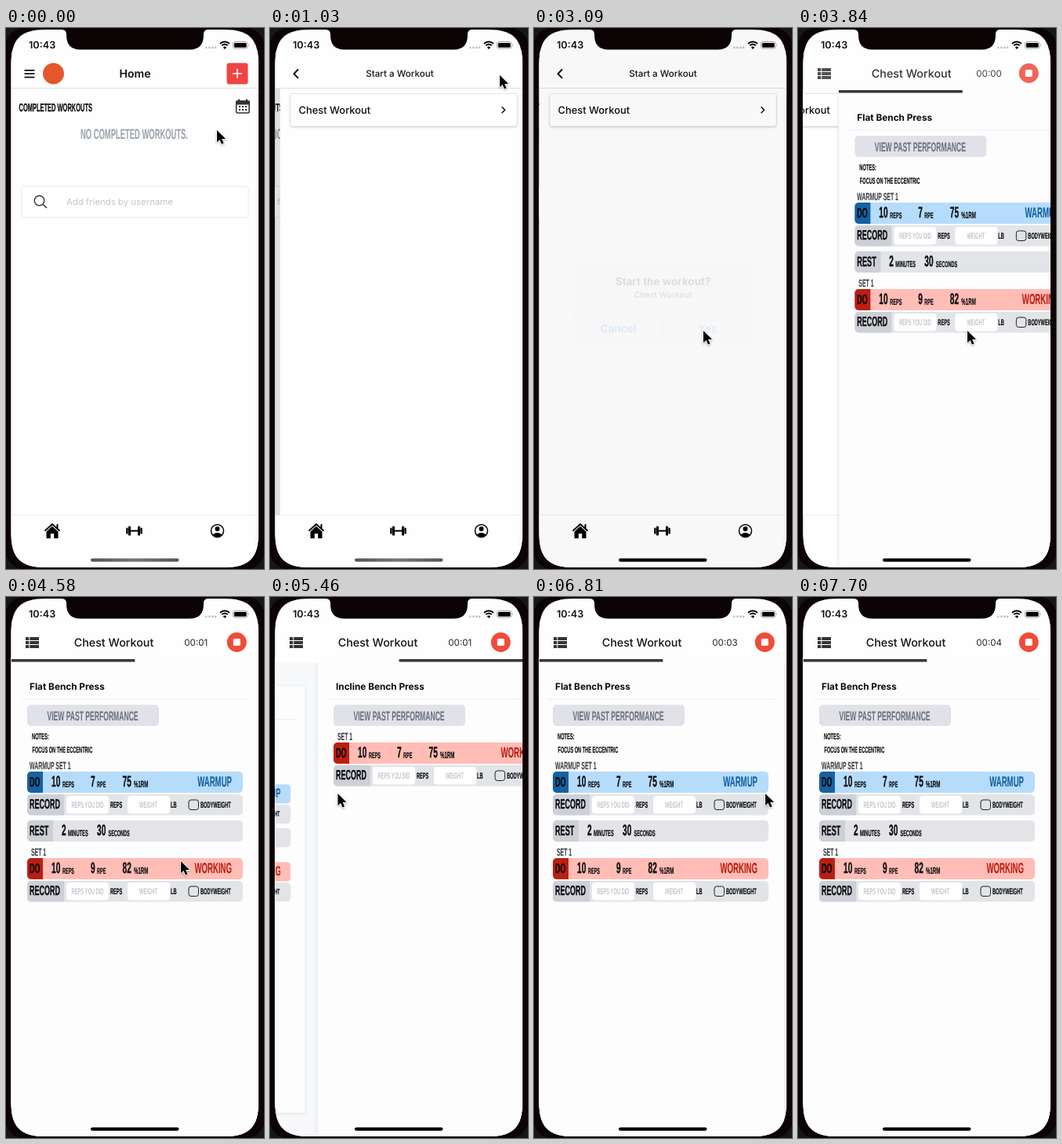
An HTML page that plays this animation: 329x688 px, repeating every 8.45 s.

```html
<!DOCTYPE html>
<html lang="en">
<head>
<meta charset="utf-8">
<title>Workout app demo</title>
<style>
html, body { margin: 0; width: 100%; height: 100%; overflow: hidden; background: #0b0304; }
svg { display: block; width: 329px; height: 688px; }
text { font-family: Inter, "Liberation Sans", sans-serif; white-space: pre; text-rendering: geometricPrecision; }
.narrow { font-family: "Liberation Sans", Arial, sans-serif; }
.page { filter: drop-shadow(0 1px 3px rgba(30, 40, 60, .13)); }
.card { filter: drop-shadow(0 1px 1.2px rgba(0, 0, 0, .18)); }
#cursor { filter: drop-shadow(0 1px 1px rgba(0, 0, 0, .3)); }
</style>
</head>
<body>
<svg id="stage" viewBox="0 0 329 688" xmlns="http://www.w3.org/2000/svg"></svg>
<script>
const LOOP = 8450, TICK = 147.8, WIDTH = 316;
const NARROW = 0.52; // one ratio for the whole condensed face

// ---- drawing helpers ----
const rect = (x, y, w, h, fill, r = 0, extra = '') =>
  `<rect x="${x}" y="${y}" width="${w}" height="${h}" rx="${r}" fill="${fill}" ${extra}/>`;
const path = (d, fill, stroke = 'none', w = 0, extra = '') =>
  `<path d="${d}" fill="${fill}" stroke="${stroke}" stroke-width="${w}" ${extra}/>`;
const circle = (x, y, r, fill, extra = '') => `<circle cx="${x}" cy="${y}" r="${r}" fill="${fill}" ${extra}/>`;
const text = (x, y, str, size, weight = 400, fill = '#0b0b0c', anchor = 'start', id = '') =>
  `<text ${id && `id="${id}"`} x="${x}" y="${y}" font-size="${size}" font-weight="${weight}" fill="${fill}" text-anchor="${anchor}">${str}</text>`;
const narrow = (x, y, str, size, fill = '#0b0b0c', bold = size / 50, anchor = 'start') =>
  `<text class="narrow" transform="translate(${x} ${y}) scale(${NARROW} 1)" font-size="${size}" font-weight="700" fill="${fill}"
    stroke="${fill}" stroke-width="${bold}" vector-effect="non-scaling-stroke" text-anchor="${anchor}">${str}</text>`;
const group = (id, body, extra = '') => `<g id="${id}" ${extra}>${body}</g>`;
const roundLeft = (x, y, w, h, fill) =>
  path(`M${x + w} ${y}H${x + 5}a5 5 0 0 0 -5 5v${h - 10}a5 5 0 0 0 5 5h${w - 5}z`, fill);

// ---- workout rows ----
const ROW = '#e2e4e8', BLOCK = '#cdd0d6', HINT = '#c3c5ca';

function setRow(y, reps, rpe, pct, label, pale, deep) {
  const base = y + 18.8, small = y + 20;
  return rect(27, y, 275, 27, pale, 5) + roundLeft(27, y, 20, 27, deep) +
    narrow(30, base, 'DO', 17.3) +
    narrow(58, base, reps, 19.5) + narrow(72, small, 'REPS', 10.6) +
    narrow(108, base, rpe, 19.5) + narrow(116, small, 'RPE', 10.6) +
    narrow(148.5, base, pct, 19.5) + narrow(163, small, '%1RM', 11.8) +
    narrow(288, base, label, 18.5, deep, 0.15, 'end');
}

function recordRow(y) {
  const base = y + 16.5;
  return rect(27, y, 275, 26.5, ROW, 5) + roundLeft(27, y, 47, 26.5, BLOCK) +
    narrow(30, y + 18, 'RECORD', 17.3) +
    rect(77, y + 2, 54, 22.5, '#fff', 4) + narrow(104, base + 0.3, 'REPS YOU DID', 11, HINT, 0, 'middle') +
    narrow(133, base, 'REPS', 10.8) +
    rect(155, y + 2, 54, 22.5, '#fff', 4) + narrow(181.5, base + 0.3, 'WEIGHT', 11, HINT, 0, 'middle') +
    narrow(210, base, 'LB', 10.8) +
    rect(233, y + 7, 12.5, 12.5, 'none', 3, 'stroke="#222" stroke-width="1"') +
    narrow(248, base, 'BODYWEIGHT', 10.8);
}

const restRow = y => rect(27, y, 275, 27, ROW, 5) + roundLeft(27, y, 33, 27, BLOCK) +
  narrow(30, y + 18.8, 'REST', 17.6) +
  narrow(71, y + 18.8, '2', 19.5) + narrow(79, y + 20, 'MINUTES', 11) +
  narrow(116, y + 18.8, '30', 19.5) + narrow(130.5, y + 20, 'SECONDS', 10.6);

const pageTop = title => rect(7, 83, 315, 603, '#fdfdfe', 0, 'class="page"') +
  text(30, 118, title, 11.8, 700) + rect(20, 129.5, 289, 1, '#eceef1') +
  rect(27, 137, 168, 27, '#e0e2e7', 5) +
  narrow(110.5, 157, 'VIEW PAST PERFORMANCE', 16.5, '#6b7280', 0.1, 'middle');

const RED = ['#ffbdb6', '#bb1f12'], BLUE = ['#b6dcfc', '#1561a3'];
const page1 = pageTop('Flat Bench Press') +
  narrow(33, 181, 'NOTES:', 11) + narrow(33.5, 198, 'FOCUS ON THE ECCENTRIC', 10.8) +
  narrow(30, 218.5, 'WARMUP SET 1', 13.3, '#3d3f44', 0.1) +
  setRow(222, '10', '7', '75', 'WARMUP', ...BLUE) + recordRow(251) + restRow(284) +
  narrow(32, 328.5, 'SET 1', 13.3, '#3d3f44', 0.1) +
  setRow(332, '10', '9', '82', 'WORKING', ...RED) + recordRow(361);
const page2 = pageTop('Incline Bench Press') +
  narrow(32, 181.5, 'SET 1', 13.3, '#3d3f44', 0.1) +
  setRow(185, '10', '7', '75', 'WORKING', ...RED) + recordRow(214);

// ---- screens ----
const dots = [[298, 100], [302, 100], [306, 100], [298, 104], [302, 104], [306, 104]]
  .map(([x, y]) => rect(x - 1, y - 1, 2, 2, '#333')).join('');
const calendar = rect(293.7, 93, 16.4, 15, '#fff', 1.5, 'stroke="#333" stroke-width="1.6"') +
  rect(293, 92.5, 18, 5, '#333', 1) + rect(296, 90.5, 2, 4, '#333') + rect(306, 90.5, 2, 4, '#333') + dots;

const home = rect(6, 77, 317, 543, '#fefefe') +
  narrow(16.5, 106, 'COMPLETED WORKOUTS', 14.4) + calendar +
  narrow(163.5, 141, 'NO COMPLETED WORKOUTS.', 18.1, '#9ca3af', 0.1, 'middle') +
  rect(20, 201.5, 289, 39.5, '#fff', 2, 'stroke="#e8e9ec"') +
  circle(42.5, 219.5, 6.2, 'none', 'stroke="#333" stroke-width="1.4"') +
  path('M47 224l5 5', 'none', '#333', 1.5) +
  text(77, 225, 'Add friends by username', 11.4, 400, '#c4c4c7');

const list = rect(7, 77, 330, 543, '#fefefe') +
  group('card', rect(20, 83.5, 289, 41.5, '#fff', 3, 'stroke="#dfe0e2" stroke-width=".8" class="card"') +
    text(30.5, 109, 'Chest Workout', 12.9, 500) +
    path('M289.5 100.3l4 4-4 4', 'none', '#111', 1.5));

const tabs = rect(6, 619, 317, 70, '#fefefe') + rect(6, 619, 317, 1, '#eeeef0') +
  path('M49.5 639.5L59 631l9.5 8.5M65.5 631v5', 'none', '#000', 2) +
  path('M51.5 640.5L59 633.5l7.5 7v8.5h-5.3v-6h-4.4v6h-5.3z', '#000') +
  path('M156 639.5h15', 'none', '#000', 2) +
  rect(156, 633.5, 3, 12, '#000', 1) + rect(168, 633.5, 3, 12, '#000', 1) +
  rect(153.2, 635.5, 2.4, 8, '#000', 1) + rect(171.4, 635.5, 2.4, 8, '#000', 1) +
  circle(269.5, 639.5, 8, '#fff', 'stroke="#000" stroke-width="1.5"') +
  circle(269.5, 637, 3, '#000') + path('M263.5 644.5q6 -5.5 12 0q-6 5.5 -12 0z', '#000');

const homeHead = path('M23.5 53.8h13M23.5 58.2h13M23.5 62.6h13', 'none', '#111', 1.8) +
  circle(60.5, 58, 13.5, '#e4572c') + text(164.5, 63, 'Home', 14.1, 600, '#111', 'middle') +
  rect(281.5, 44.5, 27, 27, '#ef4444', 3) + path('M289 58h12M295 52v12', 'none', '#fff', 1.6);
const listHead = path('M36 52.5l-5.5 5.7 5.5 5.7', 'none', '#111', 2) +
  group('listTitle', text(164.5, 62.4, 'Start a Workout', 11.6, 500, '#111', 'middle'));
const bars = [51, 56, 61].map(y => rect(25, y, 4.3, 4, '#333') + rect(30.3, y, 11.7, 4, '#333')).join('');
const workHead = bars + group('workTitle', text(137.5, 62.8, 'Chest Workout', 14.3, 500, '#111', 'middle')) +
  text(227.3, 61.8, '00:00', 11.6, 400, '#222', 'start', 'timer') +
  circle(294.3, 57.5, 12.5, '#f04b3b') + rect(289.8, 53, 9, 9, '#fff', 1.5);

const work = rect(6, 76, 318, 612, '#f8f9fb') +
  `<g clip-path="url(#below)">${group('page2', page2)}${group('page1', page1)}</g>` +
  rect(6, 76, 318, 7, '#fefefe') + `<rect id="bar" y="79" width="158" height="3.6" rx="1" fill="#38383c"/>`;

const status = text(29, 26.2, '10:43', 12.7, 600, '#111') +
  [255.3, 259.3, 263.3, 267].map(x => circle(x, 25, 1.4, '#c4c4c6')).join('') +
  path('M273 20a8.4 8.4 0 0 1 12 0M275.3 22.4a5 5 0 0 1 7.4 0', 'none', '#000', 1.9) +
  path('M279 27l-2.2 -2.3a3 3 0 0 1 4.4 0z', '#000') +
  rect(289.5, 17.5, 18.5, 8.6, 'none', 2.4, 'stroke="#999" stroke-width=".9"') +
  rect(290.9, 18.9, 15.7, 5.8, '#000', 1.3) + path('M309.2 20.3q1.6 1.5 0 3z', '#999');

const alertBox = rect(50.5, 296.5, 228, 104, '#f3f3f3', 11) +
  text(164.5, 326.5, 'Start the workout?', 13.6, 600, '#111', 'middle') +
  text(164.5, 343.4, 'Chest Workout', 10.5, 400, '#111', 'middle') +
  rect(50.5, 363, 228, 0.8, '#cfcfd2') + rect(164.2, 363, 0.8, 37.5, '#cfcfd2') +
  text(107.5, 387, 'Cancel', 13.7, 600, '#007aff', 'middle') +
  text(221.5, 387, 'Yes', 13.7, 400, '#007aff', 'middle');

const glass = 'M50.5 2H278C310 2 322 14 322 46V642C322 674 310 686 278 686H50.5C18.5 686 6.5 674 6.5 642V46C6.5 14 18.5 2 50.5 2z';
const notch = 'M71 0V2q6 0 6 6v1q0 18.5 18 18.5H234q18 0 18 -18.5v-1q0 -6 6 -6V0z';
const pointer = 'M0 0V15.2l3.5 -3.2 2.4 5.6 2.7 -1.1 -2.4 -5.4h4.9z';

document.getElementById('stage').innerHTML = `
<defs>
  <clipPath id="glass"><path d="${glass}"/></clipPath>
  <clipPath id="body"><rect x="0" y="77" width="329" height="542"/></clipPath>
  <clipPath id="below"><rect x="0" y="83" width="329" height="605"/></clipPath>
  <linearGradient id="shine"><stop offset="0" stop-color="#555"/><stop offset=".5" stop-color="#777"/><stop offset="1" stop-color="#555"/></linearGradient>
</defs>
${rect(0, 0, 329, 688, '#15171a')}${rect(-1, -1, 331, 690, '#0b0304', 26)}
<g clip-path="url(#glass)">
  ${rect(0, 0, 329, 688, '#fefefe')}
  ${group('under', `<g clip-path="url(#body)">${group('home', home)}${rect(6, 77, 317, 543, '#000', 0, 'id="shade"')}${group('list', list)}</g>` + tabs)}
  ${group('work', work)}
  ${rect(6, 28, 317, 48, '#fefefe')}
  ${rect(6, 76, 317, 1, '#dddde0', 0, 'id="headLine"')}
  ${group('homeHead', homeHead)}${group('listHead', listHead)}${group('workHead', workHead)}
  ${status}
  ${rect(6, 0, 318, 688, '#000', 0, 'id="dim"')}
  ${group('alert', alertBox)}
  ${rect(108, 674.5, 112.5, 4.2, '#000', 2.1, 'id="handle"')}
</g>
${path(notch, '#0b0304')}
${group('cursor', path(pointer, '#000', '#fff', 1.8, 'stroke-linejoin="round" paint-order="stroke"'))}`;

const $ = {};
document.querySelectorAll('#stage [id]').forEach(el => $[el.id] = el);

// ---- motion: rows are [tick, values...] ----
const cursorKeys = [[0, 269, 130], [1, 276, 112], [3, 294, 61], [7, 293, 60], [8, 293, 97], [9, 235, 110],
  [10, 222, 112], [15, 222, 112], [19, 216, 385], [30, 216, 385], [31, 223, 336], [32, 240, 334], [34, 240, 334],
  [35, 205, 330], [36, 95, 300], [38, 78, 200], [40, 92, 130], [42, 92, 130], [43, 217, 125], [44, 285, 138],
  [46, 295, 250], [48, 306, 470], [50, 316, 672], [51, 400, 800]];
const scrollKeys = [[34, 0], [35, 25], [36, 130], [37, 262], [38, 308], [39, 315], [40, 316], [42, 316],
  [43, 198], [44, 75], [45, 18], [46, 3], [47, 0]];
const pressKeys = [[12, 1], [13, 0.35], [14, 0.68], [15, 1]];

function at(keys, k) {
  const next = keys.findIndex(row => row[0] > k);
  if (next === 0) return keys[0].slice(1);
  if (next < 0) return keys[keys.length - 1].slice(1);
  const a = keys[next - 1], b = keys[next], p = (k - a[0]) / (b[0] - a[0]);
  return a.slice(1).map((v, i) => v + (b[i + 1] - v) * p);
}
const clamp = v => Math.min(1, Math.max(0, v));

// Critically damped spring: the share of the way still to go.
function left(t, start) {
  const u = Math.max(0, t - start) / 1000 * 18.26, v = (1 + u) * Math.exp(-u);
  return v < 0.001 ? 0 : v;
}

function alertLevel(t) {
  if (t < 1965) return 0;
  const v = t < 2958 ? 1 - Math.exp((1965 - t) / 90) : Math.exp((2957 - t) / 70);
  return v < 0.03 ? 0 : v;
}

const move = (el, x, y = 0) => el.setAttribute('transform', `translate(${x} ${y})`);
const fade = (el, o) => el.setAttribute('opacity', o);
const place = (el, x, s, cy) =>
  el.setAttribute('transform', `translate(${164.5 + x} ${cy}) scale(${s}) translate(-164.5 ${-cy})`);
const fadeOut = rest => clamp(rest * 1.3 - 0.3);

function draw(time) {
  const k = Math.floor((time + 16) / TICK), t = k * TICK;

  const toList = left(t, 712), toWork = left(t, 3655);
  move($.home, -0.3 * WIDTH * (1 - toList));
  fade($.shade, 0.12 * (1 - toList));
  move($.list, WIDTH * toList);
  move($.under, -0.3 * WIDTH * (1 - toWork));
  move($.work, WIDTH * toWork);
  fade($.homeHead, fadeOut(toList));
  fade($.listHead, (1 - toList) * fadeOut(toWork));
  fade($.workHead, 1 - toWork);
  fade($.headLine, toWork);
  move($.listTitle, 50 * toList - 50 * (1 - toWork));
  move($.workTitle, 50 * toWork);
  fade($.card, at(pressKeys, k)[0]);

  const level = alertLevel(t), grow = t < 2958 ? 1 + 0.2 * (1 - level) : 1;
  fade($.dim, 0.2 * level);
  fade($.alert, level);
  place($.alert, 0, grow, 348.5);

  const scroll = at(scrollKeys, k)[0], turn = clamp((scroll - 118) / 80);
  place($.page1, -scroll, 1 - 0.1 * turn, 384.5);
  place($.page2, WIDTH - scroll, 0.9 + 0.1 * turn, 384.5);
  $.bar.setAttribute('x', scroll > WIDTH / 2 ? 164.5 : 6.5);
  $.timer.textContent = '00:0' + Math.max(0, Math.min(4, Math.floor((k - 24) / 7)));

  $.handle.setAttribute('fill', k < 13 ? 'url(#shine)' : '#000');
  move($.cursor, ...at(cursorKeys, k));
}

function loop() {
  draw(performance.now() % LOOP);
  requestAnimationFrame(loop);
}
loop();
</script>
</body>
</html>
```
